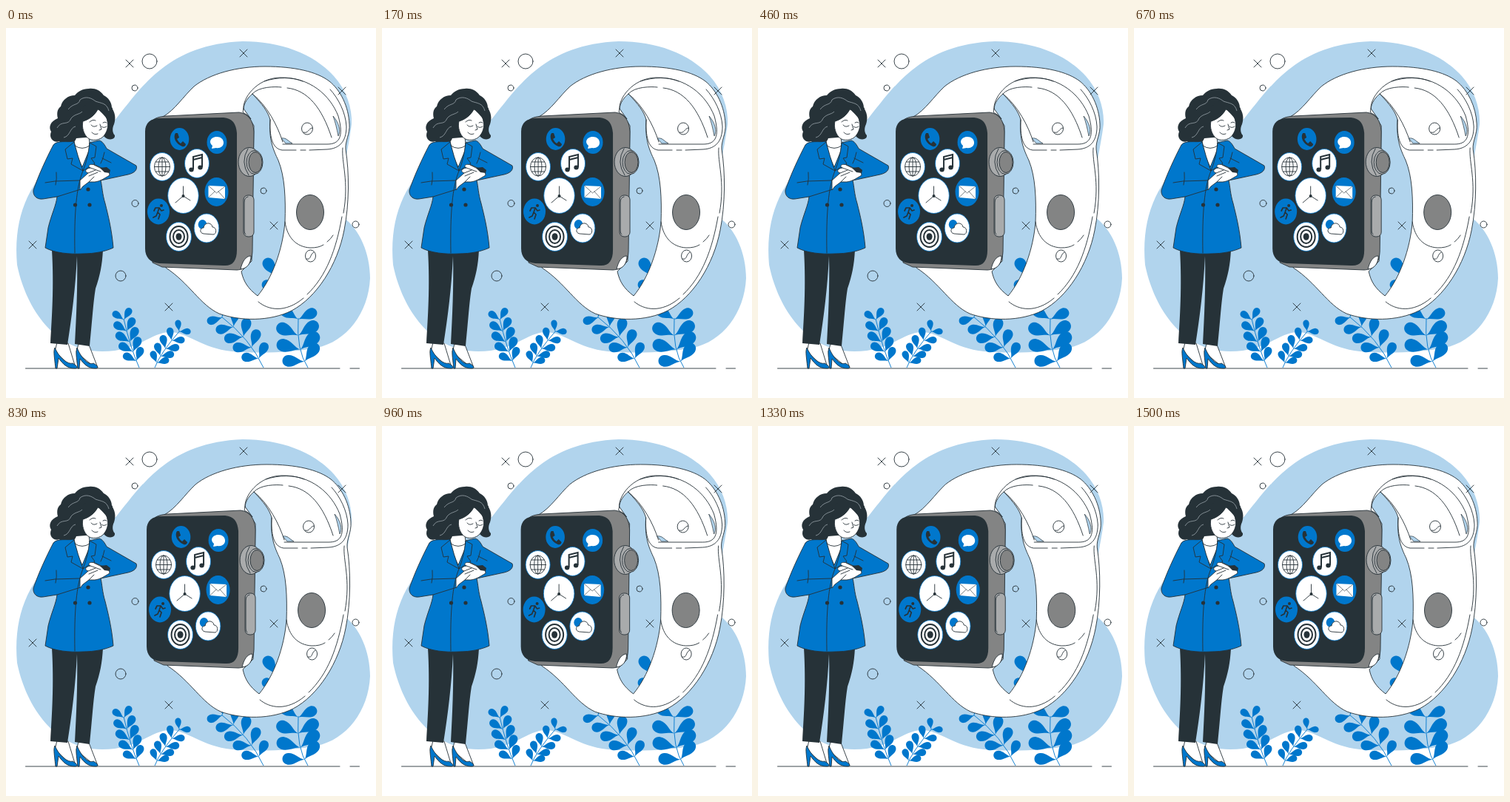
Write an HTML page that moves like this. It is 500 px wide and 500 px high and loops after 1.54 s.

```html
<!DOCTYPE html>
<html lang="en">
<head>
<meta charset="utf-8">
<title>Smartwatch</title>
<style>
html, body { margin: 0; width: 100%; height: 100%; overflow: hidden; background: #fff; }
svg { display: block; width: 100vw; height: 100vh; }
.ln { fill: none; stroke: #263238; stroke-width: .9; stroke-linecap: round; stroke-linejoin: round; }
.w { fill: #fff; stroke: #263238; stroke-width: .9; stroke-linejoin: round; }
.b { fill: #0077cc; stroke: #263238; stroke-width: .9; stroke-linejoin: round; }
.k { fill: #263238; }
.g { fill: #838484; stroke: #263238; stroke-width: .9; }
.lg { fill: #a9abac; stroke: #263238; stroke-width: .9; }
.wi { fill: #fff; stroke: #0077cc; stroke-width: .8; }
.bi { fill: #0077cc; }
</style>
</head>
<body>
<svg viewBox="0 0 500 500">
  <path fill="#b1d4ed" d="M320 18C370 18 415 34 443 65C460 84 468 108 467 130C462 170 448 215 456 256C478 272 492 305 492 338C490 385 460 424 420 432C385 439 340 440 305 437C265 433 245 411 222 411C195 411 180 437 130 437C60 437 25 370 15 320C10 265 25 220 60 185C100 155 130 145 150 121C185 78 220 22 320 18Z"/>
  <path class="ln" d="M26.500 460H451M465 460H477.500"/>
  <g id="plants"></g>
  <g class="ln">
    <circle cx="194" cy="45" r="10"/><circle cx="174" cy="81" r="4"/>
    <circle cx="174.500" cy="237" r="4.500"/><circle cx="155" cy="335" r="7"/>
    <circle cx="348" cy="220" r="4"/><circle cx="472.500" cy="265.500" r="4.500"/>
    <path d="M162 43l10 10m0-10l-10 10M316 29l10 10m0-10l-10 10M31 288l10 10m0-10l-10 10M215 372l10 10m0-10l-10 10M357 262l10 10m0-10l-10 10"/>
  </g>

  <g id="woman">
    <path class="w" d="M69 425L66 437L86 456L94 459L84 426ZM98 427L95 438L118 457L124 459L112 428Z"/>
    <path class="b" d="M66 432C64 437 65 441 67 460H69L71 446C77 454 82 460 93 460C98 460 97 457 90 453C84 455 72 446 66 432ZM96 432C94 438 95 443 97 460H99L100 447C106 455 111 460 121 460C126 460 124 456 118 453C112 456 102 447 96 432Z"/>
    <path class="k" d="M62 300C65 350 62 390 60 426L83 428C89 390 94 350 96 308C97 350 95 390 93 427L113 430C117 390 118 370 121 352C127 335 130 320 131 300Z"/>
    <path class="w" d="M92 142L91 157L100 189L106 191L114 178L113 156L112 148Z"/>
    <path class="k" d="M112 82C103 82 97 86 93 91C84 91 76 97 74 106C68 110 69 118 70 122C60 126 57 134 61 140C57 150 66 156 72 153C78 161 91 160 95 149L132 146C138 153 148 151 147 145C144 142 143 136 146 130C149 121 147 114 143 108C143 100 138 94 132 91C127 84 120 81 112 82Z"/>
    <path class="w" stroke-width=".8" d="M124 110C131 112 136 119 137 126C139 134 136 141 132 146C127 152 116 153 111 149C105 144 102 134 104 126C112 124 120 118 124 110Z"/>
    <path class="k" d="M101 127C112 124 121 117 124 109C128 114 134 118 139 127L144 108L120 95L100 109Z"/>
    <path class="ln" stroke-width=".8" d="M113 127Q117 123 121 125M115 131Q118 135 123 132M129 133Q132 136 136 133M131 128Q134 126 136 128M127 130Q128 134 129 137L126 138M116 141Q119 145 124 143"/>
    <path fill="none" stroke="#a9b4ba" stroke-width=".7" d="M84 110C91 101 98 105 100 97C108 91 116 95 121 99C129 102 136 101 139 112M69 135C75 124 84 133 88 122C93 116 99 117 103 113M78 148C87 146 86 135 94 133"/>
    <path class="b" d="M92 153C83 155 70 151 64 158C54 177 44 199 37 219C36 227 42 232 50 231L69 228C68 239 61 253 57 270L53 297C66 304 85 306 104 305C120 305 134 302 145 297C143 273 138 253 134 237C130 224 130 214 128 206L165 198C174 196 178 191 176 186C163 178 149 171 136 163C133 157 130 153 126 152L113 155L112 166L103 188Q95 173 92 153Z"/>
    <path class="b" d="M92 154L80 164L83 177L90 176L88 184L104 193Q97 174 92 154ZM113 155L122 160L120 175L115 176L120 183L104 193Q111 176 113 155Z"/>
    <path class="ln" d="M93 159Q103 166 113 159M104 193C95 215 92 250 93 304M68 195Q69 204 67 212M53 209L66 207L100 206M69 228L101 218M130 176L142 182M133 168Q131 178 128 183"/>
    <path class="w" d="M100 206L111 196C105 194 108 190 114 189C109 186 114 183 120 185L129 189L139 192L140 199C133 203 128 207 120 208L112 208L104 214L100 219Z"/>
    <path class="ln" d="M111 196L121 192M112 200L124 195M114 189L128 194M119 185L131 191M112 208L119 201"/>
    <path class="k" d="M127 189L136 188L141 192L140 196L133 195Z"/>
    <g class="k"><circle cx="111" cy="218" r="2.600"/><circle cx="93.500" cy="239" r="2.600"/><circle cx="113" cy="239" r="2.600"/></g>
  </g>

  <g id="watch">
    <path class="w" fill-rule="evenodd" d="M212 120C228 111 240 92 254 79C275 62 312 52 350 52C390 52 420 59 437 72C452 84 463 106 464 130C465 143 458 153 459 164C464 195 464 238 457 273C448 320 420 364 386 382C356 397 316 396 288 386C262 374 248 345 216 324ZM321 110C321 101 328 93 333 89C347 104 354 113 357 124C355 151 361 164 368 179C377 201 378 231 377 262C374 299 360 338 340 362C327 352 321 343 318 329L332 315L335 132Z"/>
    <g class="ln">
      <path d="M321 110C319 96 338 68 370 67C411 66 438 91 449 119C457 148 450 157 434 157H374"/>
      <path d="M333 89C341 79 364 79 372 80M380 81C408 84 427 108 440 148M333 89C353 105 367 132 374 154"/>
      <path d="M357 124C356 145 359 163 373 165H392M398 165H405M410 165L434 164C451 163 460 153 460 133C459 114 449 95 438 83"/>
      <path d="M349 72C367 66 387 66 401 72M455 162C453 181 464 207 456 250M454 255C446 300 433 335 407 360M402 365C377 386 354 381 341 370"/>
      <path d="M377 262C380 284 393 296 411 297C419 297 424 296 429 293M434 289Q439 285 442 280"/>
    </g>
    <path fill="#b1d4ed" stroke="#263238" stroke-width=".7" d="M442 119C450 128 453 139 449 146C447 136 445 127 442 119ZM372 149L378 156H387C380 152 379 148 372 149Z"/>
    <ellipse class="g" cx="411" cy="249" rx="18.500" ry="23.500"/>
    <ellipse class="w" cx="407" cy="136" rx="7.500" ry="8"/>
    <path class="ln" d="M402 141C409 143 408 136 414 135"/>
    <ellipse class="w" cx="411.500" cy="308" rx="7" ry="8"/>
    <path class="ln" d="M406 312C413 314 410 306 416 303"/>

    <path class="g" d="M199 124Q204 120 216 119L315 114C328 116 334 125 335 140L333 302C332 319 325 326 312 327L211 323L198 317Z"/>
    <path class="w" d="M317 326C319 316 324 308 331 308C331 318 326 325 317 326ZM321 109L320 114Q327 117 331 123Z"/>
    <path class="k" d="M188 140C188 128 196 122 207 122L294 121C306 122 311 129 312 142L312 300C312 315 306 322 294 321L207 318C195 317 188 310 188 298Z"/>
    <ellipse class="lg" cx="329" cy="181" rx="15" ry="19.500"/>
    <path class="ln" d="M327 163Q316 181 328 199"/>
    <ellipse class="lg" cx="336" cy="181.500" rx="11" ry="16"/>
    <ellipse class="g" cx="337" cy="181.500" rx="9" ry="14"/>
    <rect class="lg" x="321" y="226" width="14" height="56" rx="6"/>
    <path class="ln" d="M324 279Q322 278 322 272V236Q322 229 327 228"/>

    <ellipse class="bi" cx="234.500" cy="150" rx="12.800" ry="15"/>
    <path class="k" d="M229 142L232 142L234 148L231 150Q233 154 236 156L239 153L243 157Q242 161 238 160C230 157 225 148 229 142Z"/>
    <ellipse class="bi" cx="285" cy="154.500" rx="13.500" ry="15.500"/>
    <path fill="#fff" d="M285 147C290 147 294 150 294 155C294 160 289 163 284 162L278 163L279 159C273 154 277 147 285 147Z"/>

    <ellipse class="wi" cx="211" cy="187.500" rx="16.500" ry="19"/>
    <g class="ln"><ellipse cx="211" cy="187.500" rx="10.500" ry="12.500"/><ellipse cx="211" cy="187.500" rx="5" ry="12.500"/><path d="M211 175V200M200.500 187.500H221.500M202.500 181H219.500M202.500 194H219.500"/></g>
    <ellipse class="wi" cx="258" cy="183" rx="16.500" ry="19.500"/>
    <path fill="none" stroke="#263238" stroke-width="2" d="M253 191V174L265 171V188M253 178L265 175"/>
    <g class="k"><ellipse cx="250.500" cy="191.500" rx="3.200" ry="3"/><ellipse cx="262.500" cy="188.500" rx="3.200" ry="3"/></g>

    <ellipse class="wi" cx="239.500" cy="226.500" rx="20.800" ry="24"/>
    <path class="ln" d="M239.500 227V214M239.500 227L249 233"/><path class="ln" stroke-width="1.600" d="M239.500 227L229 236"/>
    <circle class="k" cx="239.500" cy="227" r="2"/>

    <ellipse class="bi" cx="284.500" cy="221.500" rx="16" ry="19.500"/>
    <path fill="#fff" d="M273.500 213L296 214V231L273.500 229Z"/>
    <path class="ln" style="stroke-width:.6" d="M273.500 213L284.500 223L296 214M273.500 229L282 221M296 231L287 221"/>

    <ellipse class="bi" cx="206" cy="248" rx="15" ry="17.500"/>
    <circle class="k" cx="210" cy="240" r="2"/>
    <path fill="none" stroke="#263238" stroke-width="1.700" stroke-linecap="round" stroke-linejoin="round" d="M207 243L205 249L208 252L206 258M205 249L203 254L199 256M207 243L202 243L200 247M207 243L210 247L213 246"/>
    <ellipse class="wi" cx="233.500" cy="282" rx="17" ry="19.500"/>
    <g fill="none" stroke="#263238" stroke-width="2"><ellipse cx="233.500" cy="282" rx="12" ry="14"/><ellipse cx="233.500" cy="282" rx="7.500" ry="9"/></g>
    <ellipse class="k" cx="233.500" cy="282" rx="4" ry="4.800"/>
    <ellipse class="wi" cx="271" cy="270.500" rx="16.800" ry="19.500"/>
    <ellipse class="bi" cx="265.500" cy="265.500" rx="5.800" ry="6.500"/>
    <path class="w" d="M267 278C261 277 262 270 267 270C268 262 278 262 279 269C285 269 285 279 280 279Z"/>
  </g>
  <path class="ln" d="M449 80l10 10m0-10l-10 10"/>
</svg>
<script>
const plants = document.getElementById('plants');
const watch = document.getElementById('watch');
const LEAF = 'M0 0C.25 -.02 .45 -.29 .75 -.26C1.08 -.22 1.08 .22 .75 .26C.45 .29 .25 .02 0 0Z';

function leaf(x, y, deg, len) {
  return `<path class="bi" d="${LEAF}" transform="translate(${x} ${y}) rotate(${deg}) scale(${len})"/>`;
}

// Stem along a quadratic curve, with pairs of leaves on both sides.
function plant(x0, y0, cx, cy, x1, y1, pairs, len, spread) {
  let out = `<path d="M${x0} ${y0}Q${cx} ${cy} ${x1} ${y1}" fill="none" stroke="#0077cc" stroke-width=".9"/>`;
  for (let i = 0; i < pairs; i++) {
    const t = .16 + .82 * i / (pairs - 1), s = 1 - t;
    const x = s * s * x0 + 2 * s * t * cx + t * t * x1;
    const y = s * s * y0 + 2 * s * t * cy + t * t * y1;
    const deg = Math.atan2(s * (cy - y0) + t * (y1 - cy), s * (cx - x0) + t * (x1 - cx)) * 180 / Math.PI;
    const size = len * (.82 + .18 * Math.sin(Math.PI * t));
    out += leaf(x, y, deg - spread, size) + leaf(x, y, deg + spread, size);
  }
  return out;
}

plants.innerHTML =
  plant(180, 459, 168, 432, 159, 393, 5, 22, 42) +
  plant(201, 459, 208, 440, 235, 409, 5, 19, 48) +
  plant(348, 459, 330, 420, 291, 390, 5, 26, 54) +
  plant(408, 459, 392, 435, 395, 392, 4, 33, 62) +
  leaf(366, 337, -122, 30) + leaf(371, 352, -165, 26);

// Offsets at every tenth of a 1.5 s shake.
const SHAKE = [0, -1, 2, -4, 4, -4, 4, -4, 2, -1, 0];
function shake(ms) {
  const p = ms % 1500 / 150, i = Math.floor(p);
  return SHAKE[i] + (SHAKE[i + 1] - SHAKE[i]) * (p - i);
}

const LOOP = 1540, FPS = 24, LEAD = 27;
function draw() {
  const step = Math.min(36, Math.floor((performance.now() % LOOP + 4) * FPS / 1000));
  const x = shake(step * 1000 / FPS + LEAD) - shake(LEAD);
  watch.setAttribute('transform', `translate(${x.toFixed(2)} 0)`);
  requestAnimationFrame(draw);
}
draw();
</script>
</body>
</html>
```
